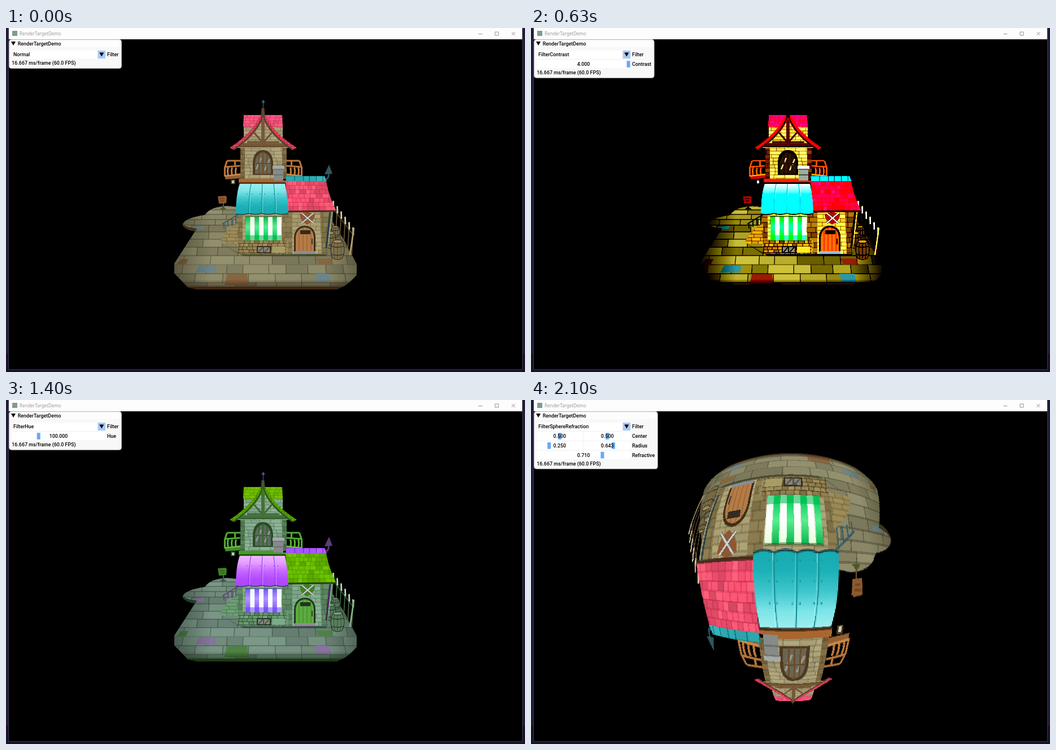
These frames come from a looping animation (919x609 px, 2.17 s). An HTML page with a canvas:

```html
<!DOCTYPE html>
<html lang="en">
<head>
<meta charset="utf-8">
<title>RenderTargetDemo</title>
<style>
html, body { margin: 0; width: 100%; height: 100%; overflow: hidden; background: #1d1a30; }
canvas { display: block; }
</style>
</head>
<body>
<canvas id="stage" width="919" height="609"></canvas>
<script>
const W = 909, H = 584, LEFT = 5, TOP = 20, STEP = 70;
const ctx = document.getElementById('stage').getContext('2d');

function makeCanvas() {
  const c = document.createElement('canvas');
  c.width = W; c.height = H;
  return c;
}

// ---------- the house ----------
const g = makeCanvas().getContext('2d', { willReadFrequently: true });
let seed = 7;
const rnd = () => (seed = seed * 16807 % 2147483647) / 2147483647;
const range = (a, b, d) => Array.from({ length: Math.ceil((b - a) / d) + 1 }, (_, i) => a + i * d);

function fill(d, color) { g.fillStyle = color; g.fill(new Path2D(d)); }
function line(d, color, width = 1) { g.strokeStyle = color; g.lineWidth = width; g.stroke(new Path2D(d)); }
function fade(y0, y1, ...colors) {
  const f = g.createLinearGradient(0, y0, 0, y1);
  colors.forEach((c, i) => f.addColorStop(i / (colors.length - 1), c));
  return f;
}
// Courses of bricks or shingles, clipped to a shape
function tiles(d, color, ys, width, joint = 'rgba(50,40,15,.26)', amp = .12, slant = 0) {
  const lean = (x, y) => x + (x - 460) * (y - ys[0]) * slant;
  g.save();
  fill(d, color);
  g.clip(new Path2D(d));
  for (let r = 0; r < ys.length - 1; r++) {
    const a = ys[r], b = ys[r + 1];
    for (let x = 280 - rnd() * width; x < 640;) {
      const e = x + width * (.7 + rnd() * .6), k = rnd() - .5;
      const box = `M${lean(x, a)} ${a}H${lean(e, a)}L${lean(e, b)} ${b}H${lean(x, b)}Z`;
      fill(box, k > 0 ? `rgba(255,245,200,${k * amp})` : `rgba(0,0,0,${-k * amp * 1.6})`);
      line(box, joint, .7);
      x = e;
    }
  }
  g.restore();
}
function barrel(x, y, w, h) {
  g.save();
  g.translate(x, y);
  const body = `M${-.7 * w} ${-h}Q${-1.3 * w} 0 ${-.7 * w} ${h}Q0 ${1.25 * h} ${.7 * w} ${h}Q${1.3 * w} 0 ${.7 * w} ${-h}Z`;
  fill(body, '#7d6f4a');
  for (const k of [-.4, 0, .4]) line(`M${k * w} ${-h}Q${k * 1.7 * w} 0 ${k * w} ${h}`, '#4a3d24', .8);
  for (const k of [-.45, .5]) line(`M${-.95 * w} ${k * h}Q0 ${k * h + 4} ${.95 * w} ${k * h}`, '#3c3a30', 1.8);
  line(body, '#2d2515', 1);
  g.beginPath();
  g.ellipse(0, -h, .7 * w, h * .2, 0, 0, 7);
  g.fillStyle = '#9a8a60';
  g.fill();
  g.stroke();
  g.restore();
}
function balcony(dir) {
  g.save();
  g.translate(455.5, 0);
  g.scale(dir, 1);
  fill('M-68 261L-39 257V266L-67 268Z', '#94602f');
  line('M-64 235H-40M-68 246L-41 244M-64 235L-68 247V263M-50 235V244', '#b4743a', 3.2);
  for (let x = -62; x < -42; x += 7) line(`M${x} 247Q${x - 2} 253 ${x} 261`, '#b9783e', 3.2);
  line('M-68 262L-40 259', '#c68a4a', 2.4);
  g.restore();
}

function drawGround() {
  const edge = 'M298 417L336 358Q312 356 313 347Q318 336 352 331Q362 316 392 315L420 318L570 330L600 378L621 418V437Q612 448 600 456L585 463H340L322 459L298 434Z';
  tiles(edge, '#8a8767', [315, 322, 330, 339, 349, 361, 374, 388, 403, 419, 435, 451, 464], 34, 'rgba(40,36,20,.45)', .16, .0012);
  fill('M342 420H372L370 433H335ZM546 435H573L576 450H551ZM330 352L352 350 350 356 330 358Z', '#6b8589');
  fill('M391 436H427L429 455H387ZM310 409H323L318 419H302ZM549 408H574L580 418H553Z', '#87663f');
  fill('M313 347Q318 353 338 355L335 360Q315 358 313 347Z', '#43371f');
  line('M298 419H621', 'rgba(235,225,180,.25)', 1);
  g.save();
  g.clip(new Path2D(edge));
  const side = g.createLinearGradient(298, 0, 621, 0);
  [[0, .4], [.2, 0], [.85, 0], [1, .35]].forEach(([p, a]) => side.addColorStop(p, `rgba(25,22,10,${a})`));
  fill('M290 310H630V464H290Z', side);
  fill('M290 445H630V464H290Z', fade(445, 463, 'rgba(30,18,6,0)', 'rgba(30,18,6,.75)'));
  fill('M290 458H630V464H290Z', '#3d2614');
  g.restore();
  fill('M380 380L411 400H500V404H420ZM500 398H570L566 404H500Z', 'rgba(40,45,15,.5)');
}

function drawTower() {
  line('M455.5 130V145', '#2c5058', 1.5);
  fill('M455.5 127L458.5 131 455.5 134 452.5 131Z', '#34606a');
  tiles('M421 170H490V268H421Z', '#aea47b', range(170, 270, 6), 17);
  tiles('M421 154H489L490 175H420Z', '#fb5880', range(154, 176, 5), 8, 'rgba(170,20,70,.3)');
  balcony(1);
  balcony(-1);
  fill('M398 268H406V276H398Z', '#4d3a25');
  fill('M400 270H404V275H400Z', '#d2cda2');
  tiles('M415 208H423V267H415ZM489 208H497V267H489Z', '#7c673f', range(208, 268, 8), 20);
  tiles('M455 150Q441 184 404 212H508Q470 184 455 150Z', '#aea47b', range(150, 212, 6), 18);
  line('M437 183L455 203L473 183M427 202H484', '#6d5231', 3);
  line('M455 152V205', '#75583a', 6);
  fill('M413 204H498V210H413Z', '#765735');
  line('M413 210H498', '#35250f', 1);
  tiles('M455 146Q440 184 396 212L404 216Q444 189 455 160Q466 189 507 216L515 212Q470 184 455 146Z', '#ea4660', range(146, 218, 4), 6, 'rgba(120,10,40,.35)');
  line('M403 215Q444 188 455 154Q466 188 507 215', '#59412a', 2.6);
  fill('M452.5 142H457.5L458.5 158H451.5Z', '#5b4630');
  fill('M437 260V239Q438 217 455 216Q472 217 473 239V260Z', '#4e3920');
  fill('M441 258V238Q443 222 455 220Q467 222 469 238V258Z', '#6a6552');
  line('M443 250L452 230M458 252L467 232', '#9a9a8d', 2.5);
  line('M455 219V259M448 223V259M462 223V259M440 240H470', '#6a4a27', 1.8);
  fill('M474 248H491V271H474Z', '#868b87');
  fill('M472 244H493V250H472Z', '#a6aaa6');
  line('M473 250H492M474 260H491', '#565b57', 1);
  fill('M412 267H474V274H412ZM474 270H496V274H474Z', '#a9662f');
  line('M412 274H496', '#4c2b12', 1.5);
}

function drawFence() {
  line('M578 318L616 368M574 345L612 400', '#57472c', 1.8);
  for (let i = 0; i < 6; i++) {
    const x = 580 + i * 7, y = 306 + i * 9.4;
    line(`M${x} ${y}L${x - 3} ${y + 42 + i * 1.5}`, '#6d5b3a', 1.6);
    line(`M${x - .5} ${y}L${x} ${y + 13}`, '#d8cca6', 2.8);
  }
  line('M616 354L609 402', '#b5a277', 2.6);
  barrel(583, 361, 8, 9);
  barrel(575, 376, 9, 13);
  barrel(587, 393, 12, 15);
}

function drawShop() {
  const dark = '#3b2c18';
  tiles('M409 326H499V400H411Z', '#aca176', range(326, 400, 7), 20);
  tiles('M499 323H579L569 400H499Z', '#aca174', range(323, 400, 7), 22);
  tiles('M489 328H500V376H489ZM500 326H507V400H498ZM556 326H574L569 400H559ZM408 330H419V376H410Z', '#897a4e', range(326, 400, 9), 14);
  tiles('M411 376H497V400H411Z', '#978654', range(376, 400, 5.5), 9, 'rgba(40,30,5,.5)', .25);
  fill('M444 386H469V399H444Z', dark);
  fill('M446 388H467V397H446Z', '#85827b');
  line('M447 397L455 388M458 397L466 388M456 387V398', '#4a473f', 1.6);
  fill('M471 387H494V398H471Z', '#a89c66');
  // steps and rail
  tiles('M379 378L390 360 409 347H411V382H384Z', '#9c8b58', range(347, 384, 6), 16);
  line('M383 347L411 330M386 346V355M393 342V352M400 338V350M407 333V348', '#365863', 1.6);
  // door
  fill('M510 397V370Q512 351 529 350Q547 351 548 370V397Z', dark);
  fill('M513 395V370Q515 354 529 353Q544 354 545 370V395Z', '#b57c46');
  line('M519 358V395M526 354V395M533 354V395M540 358V395', '#8a5930', 1);
  fill('M521 358H539V365H521Z', '#332b22');
  line('M542 373V383', '#3b3c3c', 2);
  fill('M511 395H548V400H511Z', '#858f97');
  // shield
  fill('M520 330L533 325 547 330Q547 341 533 348Q520 341 520 330Z', '#8f5730');
  line('M524 328L545 346M544 328L523 346', '#55544f', 3.4);
  line('M524 328L545 346M544 328L523 346', '#d6d6cf', 2.2);
  // striped blind
  for (let i = 0; i < 8; i++) {
    const x = 424.5 + i * 7.9, c = i % 2 ? ['#e6ffd8', '#ffffff', '#f4fbf2'] : ['#0cb653', '#59ee8e', '#07cf61'];
    fill(`M${x} 334H${x + 8}V376H${x}Z`, fade(334, 370, ...c));
  }
  fill('M424 367H488V376H424Z', 'rgba(0,185,75,.55)');
  line('M424 334H488', '#2b5a25', 1);
  // red roof and ridge
  tiles('M495 271H567Q571 297 585 324L499 325Z', '#fb5373', range(271, 326, 7.5), 9, 'rgba(175,20,60,.32)', .2);
  line('M499 325L585 324', '#4a2b1c', 3);
  tiles('M494 262H564L568 271H496Z', '#2fb3ba', [262, 272], 14, 'rgba(0,60,70,.6)');
  line('M566 268Q573 266 571 257', '#2c5058', 3);
  fill('M572 242L578 258 564 259Z', '#33565f');
  line('M574 326L567 390', '#264049', 3.4);
  // cloth canopy
  fill('M414 275H494Q499 300 500 328q-12 4-23 0q-12 4-24 0q-11 4-23 0q-12 4-23 1Q407 295 414 275Z',
    fade(275, 330, '#a2eeee', '#7be4e8', '#3cc5cb', '#1cb1b7', '#17aab0'));
  line('M407 329q11 3 23-1q12 4 23 0q12 4 24 0q11 4 23 0', '#17474a', 1.6);
  for (const [a, b] of [[434, 430], [454, 453], [474, 477]]) {
    line(`M${a} 276Q${b} 295 ${b} 328`, '#158c94', 1.2);
    line(`M${a + 1.5} 276Q${b + 1.5} 295 ${b + 1.5} 328`, 'rgba(180,255,255,.5)', 1);
    for (const y of [293, 308, 322]) fill(`M${b - 4} ${y}h1.5v1.5h-1.5zM${b + 4} ${y}h1.5v1.5h-1.5z`, '#1a959d');
  }
  line('M413 275H495', '#3e2a18', 1.4);
  // signpost
  line('M385 308V319', '#6b5030', 2.2);
  fill('M375 298L388 297 391 299 390 310 377 311Z', '#8c5a30');
  line('M378 302H387M379 306H386', '#563415', 1.2);
  fill('M379 321L384 316 391 321Z', '#4d5527');
}

g.fillStyle = '#000';
g.fillRect(0, 0, W, H);
g.translate(-LEFT, -TOP);
drawGround();
drawTower();
drawFence();
drawShop();
const src = g.getImageData(0, 0, W, H).data;

// ---------- filters: (x, y, [r, g, b]) => [r, g, b] ----------
const BLACK = [0, 0, 0];
function at(x, y) {
  x |= 0; y |= 0;
  if (x < 0 || y < 0 || x >= W || y >= H) return BLACK;
  const i = (y * W + x) * 4;
  return [src[i] / 255, src[i + 1] / 255, src[i + 2] / 255];
}
const luma = c => c[0] * .2125 + c[1] * .7154 + c[2] * .0721;
const gray = v => [v, v, v];
const each = f => (x, y, c) => c.map(f);
const mix = (a, b, t) => a.map((v, i) => v + (b[i] - v) * t);
const same = (x, y, c) => c;
const mod = (a, n) => ((a % n) + n) % n;

const convolve = kernel => {
  const n = Math.sqrt(kernel.length), h = n >> 1;
  return (x, y) => {
    const sum = [0, 0, 0];
    kernel.forEach((k, i) => {
      if (!k) return;
      const c = at(x + i % n - h, y + (i / n | 0) - h);
      for (let j = 0; j < 3; j++) sum[j] += c[j] * k;
    });
    return sum;
  };
};
const blur = n => convolve(Array(n * n).fill(1 / (n * n)));

function bulge(x, y, c) {
  const R = .25 * W, dx = x - W / 2, dy = y - H / 2, d = Math.hypot(dx, dy);
  if (d >= R) return c;
  const k = (1 - (1 - d / R) * .5) ** 2;
  return at(W / 2 + dx * k, H / 2 + dy * k);
}
const refract = (sign, light) => (x, y) => {
  const R = .25 * W, nx = (x - W / 2) / R, ny = (y - H / 2) / R, d = nx * nx + ny * ny;
  if (d >= 1) return BLACK;
  const nz = Math.sqrt(1 - d), k = sign * .5 * (Math.sqrt(1 - .71 * .71 * d) - .71 * nz);
  const c = at(W * (.5 + k * nx), H * (.5 + k * ny));
  if (!light) return c;
  const spot = Math.max(0, (-.5 * nx - .5 * ny + nz) / 1.225) ** 15;
  return c.map(v => v + 2.5 * (1 - nz ** .25) + spot);
};
function cga(x, y) {
  const c = at(x - x % 3, y - y % 3);
  const dist = p => Math.hypot(...p.map((v, i) => v - c[i]));
  return [[1, 1, 1], BLACK, [0, 1, 1], [1, 0, 1]].reduce((a, b) => dist(b) < dist(a) ? b : a);
}
function crosshatch(x, y, c) {
  const u = x / W, v = 1 - y / H, l = luma(c), s = .03, w = .003;
  const hit = mod(u + v, s) <= w || l < .75 && mod(u - v, s) <= w ||
    l < .5 && mod(u + v - s / 2, s) <= w || l < .3 && mod(u - v - s / 2, s) <= w;
  return gray(hit ? 0 : 1);
}
function halftone(x, y) {
  const s = W * .01, cx = x - x % s + s / 2, cy = y - y % s + s / 2;
  return gray(Math.hypot(x - cx, y - cy) < s / 2 * (1 - luma(at(cx, cy))) ? 0 : 1);
}
function hue(x, y, [r, gr, b]) {
  const Y = .299 * r + .587 * gr + .114 * b;
  const i = .596 * r - .275 * gr - .321 * b, q = .212 * r - .523 * gr + .311 * b;
  const a = Math.atan2(q, i) - 100 * Math.PI / 180, m = Math.hypot(i, q);
  const I = m * Math.cos(a), Q = m * Math.sin(a);
  return [Y + .956 * I + .621 * Q, Y - .272 * I - .647 * Q, Y - 1.107 * I + 1.704 * Q];
}
function monochrome(x, y, c) {
  const l = luma(c);
  return mix(c, [.6, .45, .3].map(f => l < .5 ? 2 * l * f : 1 - 2 * (1 - l) * (1 - f)), 2);
}
const sepia = (x, y, [r, gr, b]) => [
  .3588 * r + .7044 * gr + .1368 * b, .299 * r + .587 * gr + .114 * b, .2392 * r + .4696 * gr + .0912 * b];

// Control rows: [label, [value, knob position]...] or [label, r, g, b]
const half = [.5, .5], zero = [0, .5];
const modes = [
  ['Normal', same],
  ['FilterBilateralBlur', blur(3), ['Distance', [8, .8]]],
  ['FilterBoxBlur', blur(5), ['BlurSize', [1, .2]]],
  ['FilterBrightness', each(v => v + .2), ['Brightness', [.2, .6]]],
  ['FilterBulgeDistortion', bulge, ['Radius', [.25, .057]], ['Scale', [.5, .107]], ['Center', half, half]],
  ['FilterCGAColorspace', cga],
  ['FilterColorBalance', same, ['Shadows', zero, zero, zero], ['Midtones', zero, zero, zero], ['Highlights', zero, zero, zero]],
  ['FilterColorInvert', each(v => 1 - v)],
  ['FilterColorMatrix', same, ...[0, 1, 2, 3].map(r => ['Row' + r, ...[0, 1, 2, 3].map(i => [+(i == r), +(i == r)])])],
  ['FilterContrast', each(v => (v - .5) * 4 + .5), ['Contrast', [4, 1]]],
  ['FilterCrosshatch', crosshatch, ['Spacing', [.03, .3]], ['LineWidth', [.003, .3]]],
  ['FilterEmboss', convolve([-2, -1, 0, -1, 1, 1, 0, 1, 2]), ['Intensity', [1, .25]]],
  ['FilterExposure', each(v => v * 2), ['Exposure', [1, .55]]],
  ['FilterFalseColor', (x, y, c) => mix([0, 0, .502], [1, 0, 0], luma(c)), ['FirstColor', 0, 0, 128], ['SecondColor', 255, 0, 0]],
  ['FilterGamma', each(v => v * v), ['Gamma', [2, .667]]],
  ['FilterGlassSphere', refract(1, true), ['Center', half, half], ['Radius', [.25, .25], [.643, .643]], ['Refractive', [.71, .71]]],
  ['FilterGrayscale', (x, y, c) => gray(luma(c))],
  ['FilterHalftone', halftone, ['PixelSize', [.01, .1]]],
  ['FilterHaze', each(v => (v - .2) / .8), ['Distance', [.2, .7]], ['Slope', zero]],
  ['FilterHighlightShadow', same, ['Shadows', [0, 0]], ['Highlights', [1, 1]]],
  ['FilterHue', hue, ['Hue', [100, .278]]],
  ['FilterKuwahara', blur(3), ['Radius', [3, .3]]],
  ['FilterLevels', same, ['Min', [0, 0]], ['Mid', [1, .5]], ['Max', [1, 1]]],
  ['FilterLuminance', (x, y, c) => gray(luma(c))],
  ['FilterLuminanceThreshold', (x, y, c) => gray(+(luma(c) >= .5)), ['Threshold', half]],
  ['FilterMonochrome', monochrome, ['FilterColor', 153, 115, 77], ['Intensity', [2, .2]]],
  ['FilterPixelation', (x, y) => at(x - x % 6, y - y % 6), ['Pixel', [6, .06]]],
  ['FilterPosterize', each(v => Math.floor(v * 6 + .5) / 6), ['Levels', [6, .06]]],
  ['FilterSepia', sepia, ['Intensity', [1, .5]]],
  ['FilterSharpen', convolve([0, -1, 0, -1, 5, -1, 0, -1, 0]), ['Sharpness', [1, .6]]],
  ['FilterSphereRefraction', refract(-1, false), ['Center', half, half], ['Radius', [.25, .25], [.643, .643]], ['Refractive', [.71, .71]]],
];

const cache = [];
function picture(n) {
  if (cache[n]) return cache[n];
  const c = makeCanvas(), p = c.getContext('2d'), out = p.createImageData(W, H), f = modes[n][1];
  for (let y = 0, i = 0; y < H; y++) for (let x = 0; x < W; x++, i += 4) {
    const v = f(x, y, at(x, y));
    for (let j = 0; j < 3; j++) out.data[i + j] = v[j] * 255;
    out.data[i + 3] = 255;
  }
  p.putImageData(out, 0, 0);
  return cache[n] = c;
}

// ---------- window and panel ----------
function rect(x, y, w, h, color) { ctx.fillStyle = color; ctx.fillRect(x, y, w, h); }
function text(s, x, y, align = 'left', color = '#000') {
  ctx.textAlign = align;
  ctx.fillStyle = color;
  ctx.fillText(s, x, y + 3.2);
}
function down(x, y) {
  ctx.fillStyle = '#000';
  ctx.fill(new Path2D(`M${x - 4} ${y - 3}h8l-4 7z`));
}

function drawWindow() {
  rect(0, 0, 919, 609, '#211c36');
  rect(0, 577, 919, 32, '#171229');
  rect(4, 0, 911, 605, '#3a3650');
  rect(LEFT, 0, W, TOP, '#fdfdfd');
  rect(11, 5, 9, 9, '#7f9a97');
  ctx.font = '8px "Noto Sans", sans-serif';
  text('RenderTargetDemo', 24, 10, 'left', '#999');
  ctx.strokeStyle = '#777';
  ctx.lineWidth = .8;
  ctx.stroke(new Path2D('M836.5 10.5h7M866 7h6v6h-6zM895.5 7l6 6m0-6l-6 6'));
}

function drawRow([label, ...parts], y) {
  text(label, 179, y);
  if (!Array.isArray(parts[0])) {
    parts.forEach((v, i) => {
      rect(10 + i * 50.5, y - 7, 48.5, 14, '#fff');
      text('RGB'[i] + ':' + String(v).padStart(3), 34.5 + i * 50.3, y, 'center');
    });
    return rect(163, y - 6.5, 13, 13, `rgb(${parts})`);
  }
  const n = parts.length, w = (166 - 2.8 * (n - 1)) / n;
  parts.forEach(([v, t], i) => {
    const x = 10 + i * (w + 2.8);
    rect(x, y - 7, w, 14, '#fff');
    rect(x + .5 + (w - 7) * t, y - 5.8, 6, 11.6, '#69a9f6');
    text(v.toFixed(3), x + w / 2, y, 'center');
  });
}

function drawPanel([name, , ...rows]) {
  ctx.font = '500 8.9px Roboto, sans-serif';
  const width = Math.max(199, ...rows.map(r => 179 + ctx.measureText(r[0]).width + 4.5 - LEFT));
  const extra = 16.8 * rows.length;
  ctx.beginPath();
  ctx.roundRect(5.5, 20.5, width, 51 + extra, 4);
  ctx.fillStyle = '#f8f8f8';
  ctx.fill();
  ctx.strokeStyle = '#c4c4c4';
  ctx.lineWidth = .8;
  ctx.stroke();
  rect(8, 22, width - 5, 12, '#fdfdfd');
  down(13, 27);
  text('RenderTargetDemo', 20.8, 27.5);
  rect(10, 40, 153, 14, '#fff');
  rect(162.5, 40, 13.5, 14, '#a8c9f6');
  down(169.3, 46.5);
  text(name, 13, 47);
  text('Filter', 179, 47);
  rows.forEach((r, i) => drawRow(r, 64 + i * 16.8));
  text('16.667 ms/frame (60.0 FPS)', 10.3, 62 + extra);
}

let shown = -1;
function tick() {
  const n = Math.floor(performance.now() / STEP) % modes.length;
  if (n !== shown) {
    shown = n;
    drawWindow();
    ctx.drawImage(picture(n), LEFT, TOP);
    drawPanel(modes[n]);
  }
  requestAnimationFrame(tick);
}
tick();
</script>
</body>
</html>
```
